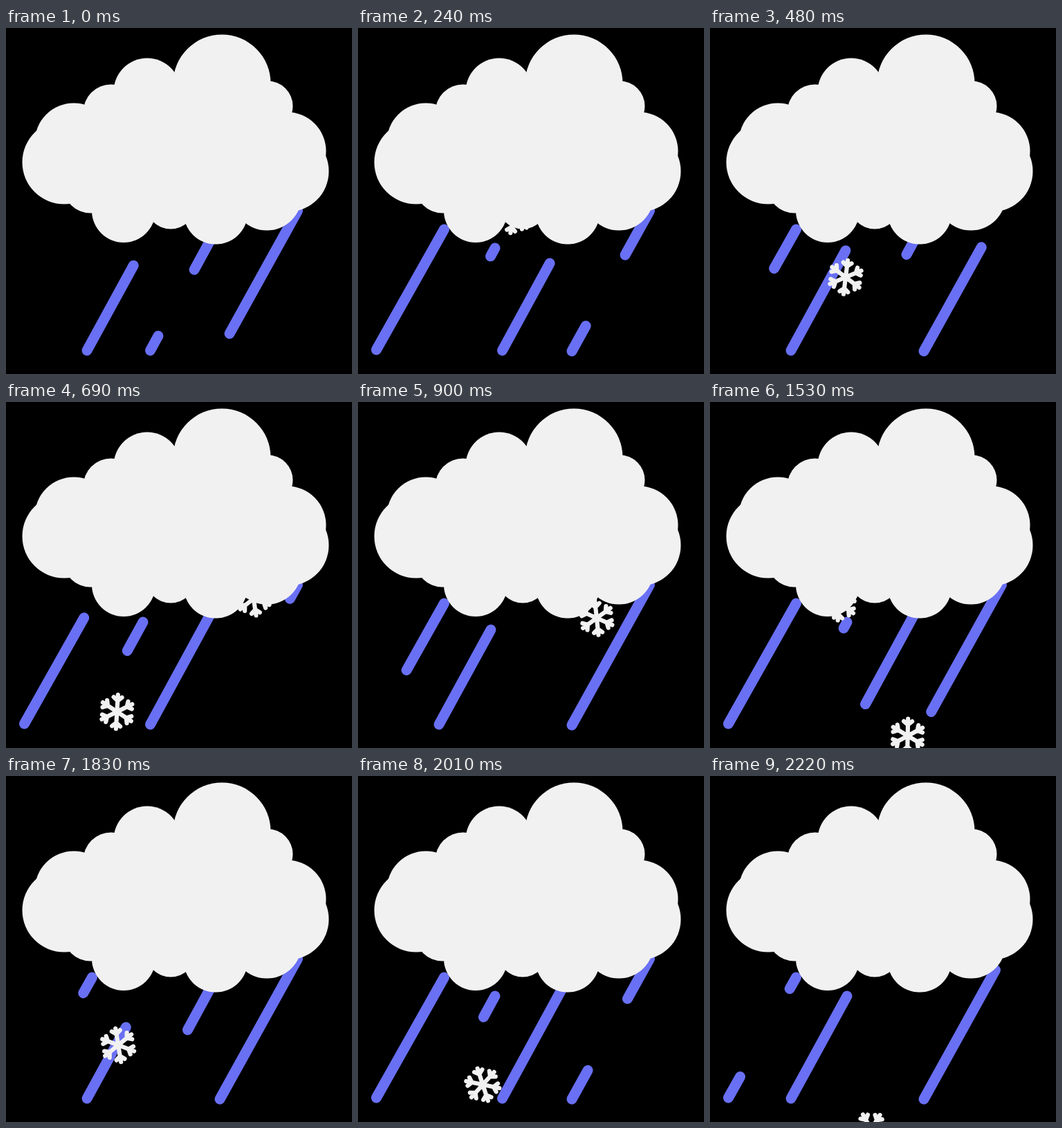
An HTML page with a canvas for the animation above (2.25 s loop, 500 by 500 pixels).

```html
<!DOCTYPE html>
<html lang="en">
<head>
<meta charset="utf-8">
<title>Sleet cloud</title>
<style>
  html, body { margin: 0; width: 100%; height: 100%; overflow: hidden; background: #000; }
  canvas { display: block; width: 500px; height: 500px; }
</style>
</head>
<body>
<canvas id="stage" width="500" height="500"></canvas>
<script>
const ctx = document.getElementById('stage').getContext('2d');
const LOOP = 2250, STEP = 30;
const TRAVEL = 200, TAIL_LAG = 251;
const WHITE = '#f1f1f1', BLUE = '#6970f4';

// Clockwise puffs: x, y, radius
const puffs = [
  [312, 80, 70.5], [378, 113, 36.5], [406, 178, 56.5], [408, 207, 58.5], [377, 242, 50.5],
  [303, 266, 46.5], [238, 254, 36.5], [170, 264, 46], [122, 228, 39.5], [84, 194, 60.5],
  [98, 165, 56.5], [152, 122, 40.5], [204, 92, 48.5]
];

// Every drop grows down its streak, then its tail follows after a fixed lag
const streaks = [
  { from: [124.5, 291], to: [26.5, 465], starts: [0, 415, 789, 1315, 1804, 2201] },
  { from: [198, 318], to: [117, 466], starts: [-285, 224, 634, 1060, 1518, 1969] },
  { from: [300, 298], to: [208.5, 466], starts: [-426, -61, 445, 1000, 1365, 1748] },
  { from: [421.5, 264], to: [309, 467], starts: [-175, 177, 670, 1349, 1600, 1953] }
];

// Flakes fall along quadratic curves while turning
const flakes = [
  { start: 210, duration: 670, curve: [[228, 262], [198, 374], [120, 535]], turn: [12, 0] },
  { start: 560, duration: 1120, curve: [[364, 274], [340, 306], [267, 542]], turn: [-10, 3] },
  { start: 1440, duration: 810, curve: [[208, 261], [100, 397], [243, 520]], turn: [10, -30] }
];

const clamp = v => Math.min(1, Math.max(0, v));
const mix = (a, b, p) => a + (b - a) * p;
const mixPoint = (a, b, p) => a.map((v, i) => mix(v, b[i], p));
const bezier = ([a, b, c], p) => mixPoint(mixPoint(a, b, p), mixPoint(b, c, p), p);

function drawStreak({ from, to, starts }, t) {
  for (const start of starts) {
    const head = clamp((t - start) / TRAVEL);
    const tail = clamp((t - start - TAIL_LAG) / TRAVEL);
    if (head <= 0 || tail >= 1) continue;
    ctx.beginPath();
    ctx.moveTo(...mixPoint(from, to, tail));
    ctx.lineTo(...mixPoint(from, to, head));
    ctx.stroke();
  }
}

function drawCloud() {
  ctx.fillStyle = WHITE;
  ctx.beginPath();
  for (const [x, y] of puffs) ctx.lineTo(x, y);
  ctx.fill();
  for (const [x, y, r] of puffs) {
    ctx.beginPath();
    ctx.arc(x, y, r, 0, Math.PI * 2);
    ctx.fill();
  }
}

function drawFlake({ start, duration, curve, turn }, t) {
  const p = (t - start) / duration;
  if (p < 0 || p > 1) return;
  ctx.save();
  ctx.translate(...bezier(curve, p));
  ctx.rotate(mix(...turn, p) * Math.PI / 180);
  ctx.beginPath();
  for (let arm = 0; arm < 6; arm++) {
    ctx.moveTo(0, 0);
    ctx.lineTo(0, -24.5);
    ctx.moveTo(-6, -21);
    ctx.lineTo(0, -16);
    ctx.lineTo(6, -21);
    ctx.rotate(Math.PI / 3);
  }
  ctx.stroke();
  ctx.restore();
}

function draw(t) {
  ctx.fillStyle = '#000';
  ctx.fillRect(0, 0, 500, 500);
  ctx.lineCap = ctx.lineJoin = 'round';
  ctx.strokeStyle = BLUE;
  ctx.lineWidth = 15;
  streaks.forEach(streak => drawStreak(streak, t));
  drawCloud();
  ctx.strokeStyle = WHITE;
  ctx.lineWidth = 6.2;
  flakes.forEach(flake => drawFlake(flake, t));
}

const startTime = performance.now();
function tick() {
  const t = (performance.now() - startTime) % LOOP;
  draw(Math.floor(t / STEP) * STEP);
  requestAnimationFrame(tick);
}
tick();
</script>
</body>
</html>
```
